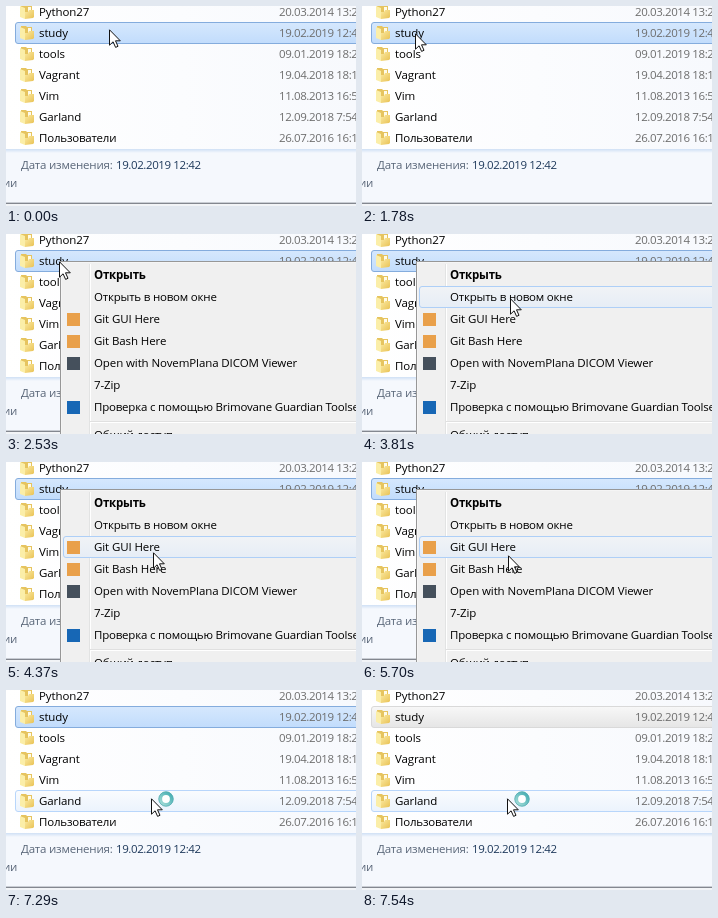
Recreate the animation shown at these times as an HTML page with a canvas. Size 350 px wide and 200 px high, loop 8 s.

```html
<!DOCTYPE html>
<html lang="ru">
<head>
<meta charset="utf-8">
<style>
html, body { margin: 0; width: 100%; height: 100%; overflow: hidden; background: #fff; }
canvas { display: block; width: 350px; height: 200px; }
</style>
</head>
<body>
<canvas id="stage" width="350" height="200"></canvas>
<script>
const ctx = document.getElementById('stage').getContext('2d');
const LOOP = 8000;

const files = [
  ['Python27', '20.03.2014 13:24'],
  ['study', '19.02.2019 12:42'],
  ['tools', '09.01.2019 18:25'],
  ['Vagrant', '19.04.2018 18:12'],
  ['Vim', '11.08.2013 16:52'],
  ['Garland', '12.09.2018 7:54'],
  ['Пользователи', '26.07.2016 16:17'],
];

const menuItems = [
  'Открыть', 'Открыть в новом окне', 'Git GUI Here', 'Git Bash Here',
  'Open with NovemPlana DICOM Viewer', '7-Zip',
  'Проверка с помощью Brimovane Guardian Toolset',
];
const menuIcons = { 2: '#e9a04a', 3: '#e9a04a', 4: '#45505c', 6: '#1767b5' };

// start time, pointer x, pointer y, highlighted menu item
const steps = [
  [0, 103, 23], [1280, 90, 23], [1530, 60, 27], [1780, 53, 27],
  [3290, 66, 27], [3540, 110, 37, 0], [3810, 148, 64, 1],
  [4090, 148, 87, 2], [4370, 147, 90, 2], [5700, 146, 93, 2],
  [5980, 139, 116, 3], [6480, 142, 113, 3], [6740, 145, 108, 3],
];
const MENU_FADE = 2280, MENU_OPEN = 2530, MENU_CLOSED = 7290, UNFOCUSED = 7540;

const styles = {
  selected: ['#d6e8fd', '#c1dcfc', '#84acdd'],
  inactive: ['#f8f8f8', '#e5e5e5', '#d9d9d9'],
  hover: ['#fafcfe', '#ebf3fd', '#b8d6fb'],
  menu: ['#f1f3f6', '#e6edf6', '#aecff7'],
};

function rect(color, x, y, w, h) {
  ctx.fillStyle = color;
  ctx.fillRect(x, y, w, h);
}

function gradient(x0, y0, x1, y1, ...colors) {
  const fill = ctx.createLinearGradient(x0, y0, x1, y1);
  colors.forEach((color, i) => fill.addColorStop(i / (colors.length - 1), color));
  return fill;
}

function text(str, x, middle, color, weight = 400) {
  ctx.font = `${weight} 11.5px "Open Sans", "Noto Sans", sans-serif`;
  const tight = /^\d\d\./.test(str) ? -0.4 : /[а-я]/i.test(str) ? -0.2 : -0.1;
  ctx.letterSpacing = tight + 'px';
  ctx.fillStyle = color;
  ctx.fillText(str, x, middle + 4);
}

function bar([top, bottom, border], x, y) {
  ctx.beginPath();
  ctx.roundRect(x + 0.5, y + 0.5, 400, 21, 2.5);
  ctx.fillStyle = gradient(0, y, 0, y + 22, top, bottom);
  ctx.fill();
  ctx.strokeStyle = border;
  ctx.lineWidth = 1;
  ctx.stroke();
}

function shape(path, fill, stroke) {
  const outline = new Path2D(path);
  ctx.fillStyle = fill;
  ctx.fill(outline);
  if (!stroke) return;
  ctx.strokeStyle = stroke;
  ctx.lineWidth = 1;
  ctx.stroke(outline);
}

function folder(x, y) {
  ctx.save();
  ctx.translate(x, y);
  shape('M2 1H7L8 2H13V13H2Z', '#e6c45f');
  shape('M9 3H12V9H9Z', '#fffbe8');
  shape('M1 2L6 4V15L1 13Z', '#fbeea8');
  shape('M6 8H9L10 6H15V13L14 14L6 15Z', gradient(6, 6, 15, 15, '#fbe9a0', '#e8c153'));
  ctx.restore();
}

function explorer(t) {
  rect(gradient(0, 0, 350, 0, '#fff', '#f7f9fd'), 0, 0, 350, 144);
  bar(t < UNFOCUSED ? styles.selected : styles.inactive, 9, 16);
  if (t >= MENU_CLOSED) bar(styles.hover, 9, 100);
  files.forEach(([name, date], i) => {
    const y = 6 + 21 * i;
    folder(13, y - 8);
    text(name, 33, y, '#000');
    text(date, 273, y, '#6d6d6d');
  });
  rect(gradient(0, 143, 0, 147, '#cfe0f5', '#f5f8fd'), 0, 143, 350, 4);
  rect('#f5f8fd', 0, 147, 350, 49);
  text('Дата изменения:', 15, 159, '#5a6779');
  text('19.02.2019 12:42', 110, 159, '#1e395b');
  text('ии', -3, 177, '#5a6779');
  rect('#c9cdd4', 0, 196, 350, 1);
  rect('#83878f', 0, 197, 350, 1);
  rect('#f2f4f7', 0, 198, 350, 2);
}

function menu(active) {
  rect('#979797', 54, 27, 296, 173);
  rect('#f5f5f5', 55, 28, 295, 172);
  rect('#f0f0f0', 56, 29, 294, 171);
  rect('#e2e3e3', 83, 30, 1, 170);
  rect('#fff', 84, 30, 1, 170);
  if (active !== undefined) bar(styles.menu, 57, 30 + 22 * active);
  menuItems.forEach((label, i) => {
    const y = 41 + 22 * i;
    if (menuIcons[i]) rect(menuIcons[i], 61, y - 6, 13, 13);
    text(label, 88, y, '#000', i ? 400 : 700);
  });
  rect('#e0e0e0', 84, 187, 266, 1);
  rect('#fff', 84, 188, 266, 1);
  text('Общий доступ', 88, 201, '#000');
}

function ring(x, y, radius, width, color) {
  ctx.beginPath();
  ctx.arc(x, y, radius, 0, 2 * Math.PI);
  ctx.strokeStyle = color;
  ctx.lineWidth = width;
  ctx.stroke();
}

function pointer(x, y, busy) {
  ctx.save();
  ctx.translate(x, y);
  shape('M.5 .8V16.2L4.1 12.8L6.6 18.4L9 17.3L6.5 11.8H11.3Z', '#fff', '#111');
  if (busy) {
    shape('M9 1a6 6 0 0 1 12 0a6 6 0 0 1 -12 0Z', '#fff');
    ring(15, 1, 5.7, 3.6, gradient(9, 7, 21, -5, '#a9dfd9', '#3fabb0'));
    ring(15, 1, 7.2, 0.8, '#58aeb4');
  }
  ctx.restore();
}

function draw(now) {
  const t = now % LOOP;
  const [, x, y, active] = steps.findLast(([start]) => start <= t);
  explorer(t);
  if (t >= MENU_FADE && t < MENU_CLOSED) {
    ctx.globalAlpha = t < MENU_OPEN ? 0.6 : 1;
    menu(active);
    ctx.globalAlpha = 1;
  }
  pointer(x, y, t >= MENU_CLOSED);
}

const began = performance.now();
function tick() {
  draw(performance.now() - began);
  requestAnimationFrame(tick);
}
tick();
</script>
</body>
</html>
```
